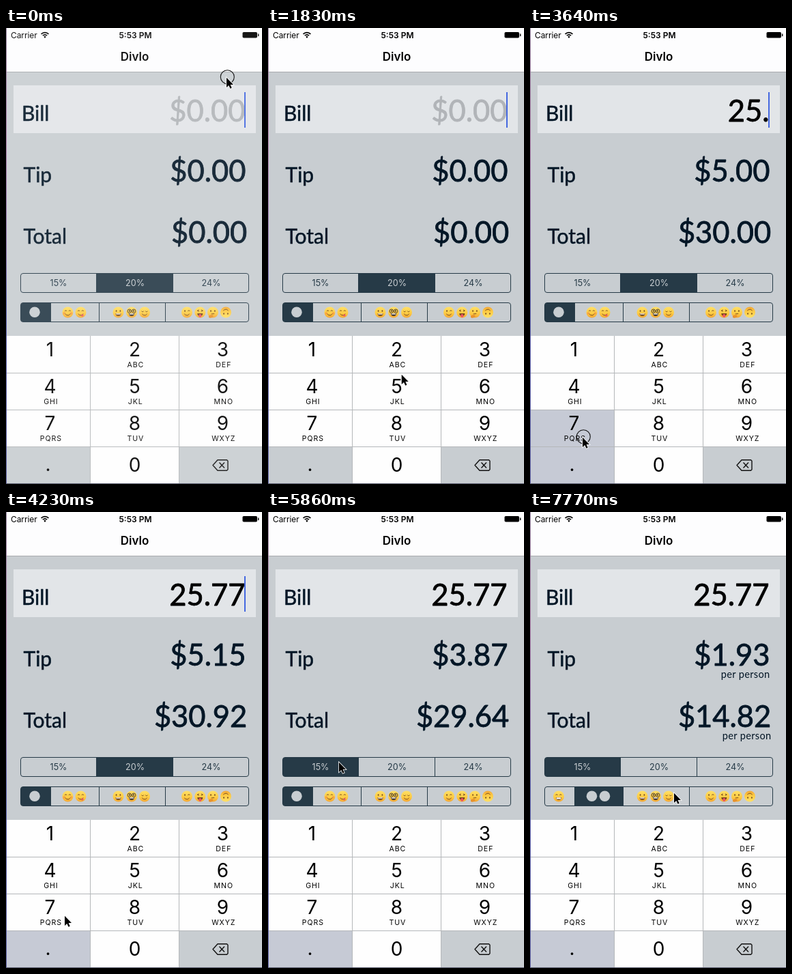
An HTML page with a canvas for the animation above (8 s loop, 375 by 668 pixels).

```html
<!DOCTYPE html>
<html lang="en">
<head>
<meta charset="utf-8">
<title>Tip calculator</title>
<style>
html, body { margin: 0; width: 100%; height: 100%; overflow: hidden; background: #c8cdd1; }
canvas { display: block; width: 375px; height: 668px; }
</style>
</head>
<body>
<canvas id="stage"></canvas>
<script>
const W = 375, H = 668, LOOP = 8000;
const BG = '#c8cdd1', NAVY = '#031626', SLATE = '#263a47', PRESSED = '#c6cad5', LINE = '#b4b7ba';
const UI = 'Inter, Roboto, sans-serif', GEO = 'Lato, "Open Sans", sans-serif';
const canvas = document.getElementById('stage');
const ctx = canvas.getContext('2d');
const dpr = window.devicePixelRatio || 1;
canvas.width = W * dpr;
canvas.height = H * dpr;

// Timeline: [time, value]
const BILL = [[0, ''], [2190, '2'], [2770, '25'], [3410, '25.'], [3810, '25.7'], [4170, '25.77']];
const CARET = [[0, 1], [160, 0], [590, 1], [1130, 0], [1590, 1], [4680, 0], [5180, 1],
  [5700, 0], [6170, 1], [6700, 0], [7160, 1], [7680, 0]];
const POINTER = [[1130, 322, 72], [1250, 350, 108], [1420, 346, 230], [1600, 278, 400], [1740, 216, 488],
  [1830, 195, 507], [1890, 178, 502], [1960, 177, 493], [2200, 177, 493], [2550, 176, 506], [2770, 176, 506],
  [2900, 132, 555], [3060, 74, 627], [3410, 74, 627], [3480, 76, 599], [3810, 76, 599], [3880, 85, 591],
  [4500, 85, 591], [4680, 90, 545], [4900, 106, 440], [5100, 110, 396], [5330, 103, 366], [6480, 103, 366],
  [6790, 107, 414], [7400, 107, 414], [7580, 165, 416], [7770, 210, 411]];
const CLICKS = [[0, 60], [2010, 2190, '2'], [2590, 2770, '5'], [3230, 3410, '.'], [3640, 3810, '7'],
  [4050, 4170, '7'], [5510, 5680, 'rate'], [6970, 7140, 'people']];

const clamp = v => Math.max(0, Math.min(1, v));
const latest = (list, t) => list.filter(e => e[0] <= t).pop();

function pointerAt(t) {
  const i = POINTER.findIndex(p => p[0] > t);
  if (i === 0) return POINTER[0].slice(1);
  if (i < 0) return POINTER[POINTER.length - 1].slice(1);
  const [a, b] = [POINTER[i - 1], POINTER[i]];
  const k = (t - a[0]) / (b[0] - a[0]);
  return [a[1] + (b[1] - a[1]) * k, a[2] + (b[2] - a[2]) * k];
}

function rect(x, y, w, h, color) {
  ctx.fillStyle = color;
  ctx.fillRect(x, y, w, h);
}

function text(s, x, y, font, color, { align = 'left', spacing = 0, bold = 0 } = {}) {
  ctx.font = font;
  ctx.textAlign = align;
  ctx.letterSpacing = spacing + 'px';
  ctx.fillStyle = ctx.strokeStyle = color;
  ctx.fillText(s, x, y);
  if (bold) {
    ctx.lineWidth = bold;
    ctx.strokeText(s, x, y);
  }
  ctx.letterSpacing = '0px';
}

function path(points, close) {
  ctx.beginPath();
  points.forEach(([x, y]) => ctx.lineTo(x, y));
  if (close) ctx.closePath();
}

function arc(x, y, r, from = 0, to = Math.PI * 2) {
  ctx.beginPath();
  ctx.arc(x, y, r, from, to);
}

function statusBar() {
  rect(0, 0, W, 64, '#fdfdfe');
  rect(0, 64, W, 1, '#a8abae');
  text('Carrier', 7, 14.5, '12px ' + UI, '#000', { spacing: -0.1 });
  text('5:53 PM', 189.5, 14.5, '600 12px ' + UI, '#000', { align: 'center' });
  text('Divlo', 188.5, 48, '600 17px ' + UI, '#000', { align: 'center' });
  ctx.strokeStyle = '#000';
  ctx.lineWidth = 1.7;
  for (const r of [4.4, 7.7]) {
    arc(57, 14.3, r, -Math.PI * 0.75, -Math.PI * 0.25);
    ctx.stroke();
  }
  ctx.beginPath();
  ctx.moveTo(57, 15);
  ctx.arc(57, 14.3, 2.3, -Math.PI * 0.75, -Math.PI * 0.25);
  ctx.fill();
  ctx.beginPath();
  ctx.roundRect(346.5, 6, 21.5, 8.5, 1.8);
  ctx.fill();
  rect(369, 8.5, 1.4, 3.6, '#000');
}

function amounts(t) {
  const bill = latest(BILL, t)[1];
  const rate = t < 5680 ? 0.2 : 0.15, people = t < 7140 ? 1 : 2;
  const value = parseFloat(bill) || 0;
  const money = v => '$' + (v / people).toFixed(2);
  const big = '43.5px ' + GEO, label = '30px ' + GEO, note = '14.6px ' + GEO;
  const right = { align: 'right', bold: 0.8 }, left = { bold: 0.5 };

  rect(11, 84, 355, 70, '#e2e5e8');
  text('Bill', 23, 135.5, label, NAVY, left);
  text('Tip', 25.5, 225.5, label, NAVY, left);
  text('Total', 25.5, 315.5, label, NAVY, left);
  text(bill || '$0.00', 350.5, 136.5, big, bill ? '#000' : '#b1b4b8', right);
  text(money(value * rate), 351.5, 224.7, big, NAVY, right);
  text(money(value * (1 + rate)), 353.3, 315, big, NAVY, right);
  if (people > 1) {
    const small = { align: 'right', spacing: 0.3 };
    text('per person', 351.5, 242.5, note, NAVY, small);
    text('per person', 353.5, 332.5, note, NAVY, small);
  }

  const [start, on] = latest(CARET, t);
  const k = start ? clamp((t - start + 30) / 90) : 1;
  ctx.globalAlpha = on ? k : 1 - k;
  rect(349, 94, 2, 52, '#4468e0');
  ctx.globalAlpha = 1;
}

function drawEyes(kind) {
  for (const s of [-1, 1]) {
    const x = s * 2.9;
    if (kind === 'arc' || (kind === 'wink' && s > 0)) {
      arc(x, -1.2, 1.5, Math.PI * 1.1, Math.PI * 1.9);
      ctx.stroke();
    } else if (kind === 'shut') {
      arc(x, -2.4, 1.6, Math.PI * 0.1, Math.PI * 0.9);
      ctx.stroke();
    } else if (kind === 'squint') {
      path([[x - s * 1.4, -3.6], [x + s * 1.2, -2.4], [x - s * 1.4, -1.2]]);
      ctx.stroke();
    } else {
      ctx.beginPath();
      ctx.ellipse(x, -2, 0.9, 1.3, 0, 0, Math.PI * 2);
      ctx.fill();
    }
    if (kind === 'glasses') {
      arc(s * 3.2, -1.8, 2.7);
      ctx.stroke();
    }
  }
}

function drawMouth(kind) {
  if (kind === 'smile' || kind === 'lick') {
    arc(0, 0.4, 4, Math.PI * 0.14, Math.PI * 0.86);
    ctx.stroke();
    if (kind === 'lick') {
      ctx.fillStyle = '#ea5a62';
      arc(2.4, 4.4, 1.6);
      ctx.fill();
    }
  } else if (kind === 'flat') {
    path([[-2.2, 2.4], [2.2, 2]]);
    ctx.stroke();
  } else {
    ctx.beginPath();
    ctx.arc(0, 1.5, 4, 0, Math.PI);
    ctx.closePath();
    ctx.fill();
    if (kind === 'tongue') {
      ctx.fillStyle = '#ee5264';
      ctx.beginPath();
      ctx.roundRect(-1.9, 2.6, 3.8, 4.8, 1.9);
      ctx.fill();
    } else {
      rect(-3.3, 1.8, 6.6, kind === 'teeth' ? 2.2 : 1.3, '#fff');
    }
  }
}

function face(x, y, eyes, mouth, extra) {
  ctx.save();
  ctx.translate(x, y);
  if (extra === 'flip') ctx.scale(1, -1);
  const g = ctx.createLinearGradient(0, -8, 0, 8);
  g.addColorStop(0, '#ffe067');
  g.addColorStop(0.6, '#fdca42');
  g.addColorStop(1, '#f2a534');
  ctx.fillStyle = g;
  arc(0, 0, 8);
  ctx.fill();
  if (extra === 'blush') {
    ctx.fillStyle = 'rgba(240,110,60,.4)';
    for (const s of [-1, 1]) {
      arc(s * 5.2, 1.4, 1.9);
      ctx.fill();
    }
  }
  ctx.strokeStyle = ctx.fillStyle = eyes === 'glasses' ? '#40342a' : '#744a1d';
  ctx.lineWidth = 0.95;
  drawEyes(eyes);
  drawMouth(mouth);
  if (extra === 'hand') {
    ctx.fillStyle = '#e8922b';
    ctx.beginPath();
    ctx.ellipse(-2.8, 6, 3.4, 2, -0.3, 0, Math.PI * 2);
    ctx.fill();
  }
  ctx.restore();
}

const FACES = [
  [[42, 'arc', 'teeth']],
  [[90.5, 'arc', 'smile', 'blush'], [109.5, 'arc', 'lick']],
  [[164.5, 'dot', 'grin'], [184, 'glasses', 'grin'], [203, 'shut', 'smile']],
  [[265, 'wink', 'smile'], [284.3, 'squint', 'tongue'], [303, 'dot', 'flat', 'hand'], [322, 'dot', 'smile', 'flip']]
];

function segments(y, edges, chosen, held, drawItem) {
  ctx.save();
  ctx.beginPath();
  ctx.roundRect(21.5, y, 334, 28, 3.5);
  ctx.clip();
  const fill = (i, color) => rect(edges[i], y, edges[i + 1] - edges[i], 28, color);
  fill(chosen, SLATE);
  if (held >= 0) fill(held, 'rgba(38,58,71,.22)');
  ctx.restore();
  ctx.strokeStyle = SLATE;
  ctx.lineWidth = 1;
  ctx.beginPath();
  ctx.roundRect(21.5, y, 334, 28, 3.5);
  for (const x of edges.slice(1, -1)) {
    ctx.moveTo(x, y);
    ctx.lineTo(x, y + 28);
  }
  ctx.stroke();
  for (let i = 0; i < edges.length - 1; i++) drawItem(i, i === chosen);
}

function controls(t, held) {
  segments(359.5, [21.5, 132.5, 244.5, 355.5], t < 5680 ? 1 : 0, held === 'rate' ? 0 : -1, (i, on) =>
    text(['15%', '20%', '24%'][i], [77, 189, 300.5][i], 378, '12.6px ' + UI, on ? BG : SLATE, { align: 'center' }));
  segments(402.5, [21.5, 65.5, 136.5, 233.5, 355.5], t < 7140 ? 0 : 1, held === 'people' ? 1 : -1, (i, on) => {
    for (const [x, ...look] of FACES[i]) {
      if (on) {
        ctx.fillStyle = BG;
        arc(x, 416.3, 7.8);
        ctx.fill();
      } else face(x, 416.5, ...look);
    }
  });
}

function keypad(t, held) {
  const keys = ['1', '2 ABC', '3 DEF', '4 GHI', '5 JKL', '6 MNO', '7 PQRS', '8 TUV', '9 WXYZ', '.', '0', ''];
  const xs = [0, 124, 254, 375], mids = [64.5, 188.5, 317.5];
  keys.forEach((key, i) => {
    const col = i % 3, row = Math.floor(i / 3), y = 451 + row * 54;
    const [digit, letters] = key.split(' ');
    const grey = i === 9 || i === 11, down = digit && digit === held;
    let color = grey ? BG : '#fefefe';
    if (down) color = grey ? '#fefefe' : PRESSED;
    else if (i === 9 && t > 3410) color = PRESSED;
    rect(xs[col], y, xs[col + 1] - xs[col], row === 3 ? H - y : 54, color);
    if (i < 9 || i === 10) text(digit, mids[col], row === 3 ? 650 : y + 30, '28px ' + UI, '#000', { align: 'center' });
    if (i === 9) text('.', 61.5, 649, '28px ' + UI, '#000', { align: 'center' });
    if (letters) text(letters, mids[col] + 1.3, y + 45.5, '10.6px ' + UI, '#000', { align: 'center', spacing: 0.9 });
  });
  for (const y of [505, 559, 613]) rect(0, y, W, 1, LINE);
  for (const x of [123, 253]) rect(x, 451, 1, H - 451, LINE);

  ctx.strokeStyle = '#111';
  ctx.lineWidth = 1.4;
  ctx.lineJoin = 'round';
  path([[303, 640.5], [310, 632.7], [323.5, 632.7], [325, 634.2], [325, 646.8], [323.5, 648.3], [310, 648.3]], true);
  ctx.stroke();
  path([[312.5, 636.5], [320, 644.5]]);
  ctx.stroke();
  path([[320, 636.5], [312.5, 644.5]]);
  ctx.stroke();
}

function pointer(t, pressed) {
  const [x, y] = pointerAt(t);
  if (pressed) {
    ctx.strokeStyle = '#111';
    ctx.lineWidth = 1.1;
    arc(x + 2.3, y - 0.2, 10);
    ctx.stroke();
  }
  ctx.save();
  ctx.translate(x + 1, y + 0.8);
  path([[0, 0], [0, 14.2], [3.3, 11.2], [5.5, 16], [7.7, 15], [5.6, 10.2], [10, 10.2]], true);
  ctx.lineJoin = 'miter';
  ctx.strokeStyle = '#fff';
  ctx.lineWidth = 1.6;
  ctx.stroke();
  ctx.fillStyle = '#000';
  ctx.fill();
  ctx.restore();
}

function desktopEdge() {
  const g = ctx.createLinearGradient(0, 0, 0, H);
  g.addColorStop(0, '#8f7c98');
  g.addColorStop(0.25, '#a0709c');
  g.addColorStop(0.5, '#7d62a0');
  g.addColorStop(0.6, '#4f53a4');
  g.addColorStop(1, '#56589a');
  rect(0, 0, 1, H, g);
  rect(0, H - 1, W, 1, '#55586a');
}

function draw(t) {
  const click = CLICKS.find(([from, to]) => t >= from && t < to);
  const held = click && click[2];
  ctx.setTransform(dpr, 0, 0, dpr, 0, 0);
  rect(0, 0, W, H, BG);
  statusBar();
  amounts(t);
  controls(t, held);
  keypad(t, held);
  const veil = t < 50 ? 1 : Math.max(0, 0.75 - 0.25 * Math.floor((t - 50) / 60));
  if (veil) rect(0, 0, W, H, `rgba(255,255,255,${0.09 * veil})`);
  desktopEdge();
  pointer(t, click);
}

const began = performance.now();
function tick() {
  draw((performance.now() - began) % LOOP);
  requestAnimationFrame(tick);
}
tick();
</script>
</body>
</html>
```
